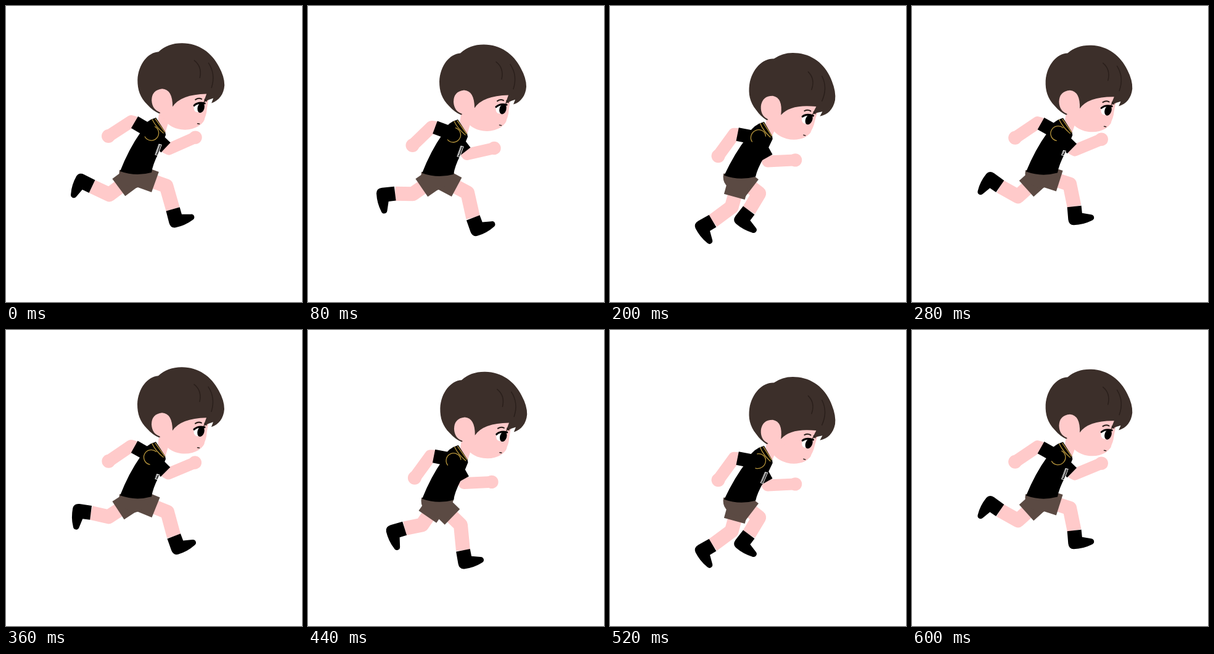
Recreate the animation shown at these times as an HTML page. Size 480 by 480 pixels, loop 0.64 s.

```html
<!DOCTYPE html>
<html lang="en">
<head>
<meta charset="utf-8">
<title>Running boy</title>
<style>
  html, body { margin: 0; width: 100%; height: 100%; overflow: hidden; background: #fff; }
  svg { display: block; width: 100%; height: 100%; }
  .skin { fill: #ffcaca; }
  .limb { fill: none; stroke: #ffcaca; stroke-linejoin: round; }
  .line { fill: none; stroke-linecap: round; }
  .hair { fill: #3c2f2a; }
  .strand { stroke: #2a1f1b; stroke-width: 1.5; }
  .seat { fill: #5b4a43; }
  .shorts { fill: none; stroke: #5b4a43; stroke-width: 35; }
  .gold { stroke: #b8963c; stroke-width: 1.3; }
  .sleeve { fill: none; stroke: #000; stroke-width: 22; }
</style>
</head>
<body>
<svg viewBox="0 0 480 480">
  <defs>
    <path id="foot" d="M-11.5 0H11.5V12L26 16Q30 17 30 21Q30 25 25 26Q12 31 -4 30Q-12 29 -12 20Z"/>
  </defs>
  <path id="backArm" class="limb" stroke-width="20" stroke-linecap="round"/>
  <path id="frontArm" class="limb" stroke-width="19" stroke-linecap="round"/>
  <circle id="backHand" class="skin" r="11"/>
  <circle id="frontHand" class="skin" r="10.7"/>

  <path id="legB" class="limb" stroke-width="23"/>
  <use id="footB" href="#foot"/>
  <path id="legA" class="limb" stroke-width="23"/>
  <use id="footA" href="#foot"/>
  <path id="shortsB" class="shorts"/>
  <path id="shortsA" class="shorts"/>
  <path id="seat" class="seat" d="M184 266Q180 288 208 296Q230 291 237 267Z"/>

  <g id="neck"><path class="skin" d="M249 165L246 188L258 206L264 186Z"/></g>
  <path id="backSleeve" class="sleeve"/>
  <path id="frontSleeve" class="sleeve"/>
  <g id="shirt">
    <path d="M243 181L235 184Q222 191 218 205Q199 232 185 268Q210 277 236 270Q238 257 247 239L259 209L258 204Z"/>
    <path class="line gold" d="M237 184Q243 196 255 206"/>
    <path class="line gold" d="M242 183L257 204"/>
    <path id="ring" class="line gold"/>
    <path id="strip" fill="none" stroke="#fff"/>
  </g>

  <g id="head">
    <path class="skin" d="M255 136H332Q326 158 325 172Q324 177 322 182Q322 187 313 194Q300 202 284 200Q263 197 254 180Z"/>
    <path class="hair" d="M247 74Q262 60 285 60C312 60 333 75 345 98Q354 114 354 128C353 143 345 153 333 157L336 149Q328 151 320 156L325 142Q283 143 270 163L262 170L248 174Q238 170 229 160C217 148 213 136 213 120C214 94 230 75 247 74Z"/>
    <path class="skin" d="M270 163Q270 135 253 134Q236 136 236 153Q237 168 249 172L262 188L280 168Z"/>
    <path class="line strand" d="M305 88Q318 98 314 116M328 92Q340 110 333 132"/>
    <ellipse cx="310" cy="165" rx="5.5" ry="7" fill="#fff"/>
    <ellipse cx="316" cy="164.500" rx="5.5" ry="8.5" transform="rotate(16 316 164.500)"/>
    <path class="line" stroke="#000" stroke-width="3" d="M305 161Q311 155 322 157.500"/>
    <path class="line" stroke="#2a1f1b" stroke-width="2" d="M307 151.500Q312 148 317 150.500"/>
    <path class="line" stroke="#2a1f1b" stroke-width="1.5" d="M322 151L325 154M310.500 190.500L313.500 191"/>
  </g>
</svg>
<script>
const LOOP = 640, STEP = 40, DEG = Math.PI / 180;
const { sin, cos, PI } = Math;

// Arm joints with the limbs spread and with the body crouched.
const arms = {
  back: {
    spread: { shoulder: [228, 200], cuff: [208.5, 188.5], elbow: [203, 187], hand: [166, 211] },
    crouched: { shoulder: [226, 209], cuff: [203.5, 205], elbow: [198, 205], hand: [173, 241] }
  },
  front: {
    spread: { shoulder: [249, 220], cuff: [259, 229.5], elbow: [264, 232], hand: [307, 213] },
    crouched: { shoulder: [244, 231], cuff: [250.5, 243], elbow: [252, 249], hand: [297, 248] }
  }
};

const el = id => document.getElementById(id);
const setPath = (id, d) => el(id).setAttribute("d", d);
const move = (id, transform) => el(id).setAttribute("transform", transform);
const line = (...points) => "M" + points.map(p => p.join(" ")).join("L");
const smooth = u => u * u * (3 - 2 * u);
const clamp = u => Math.min(1, Math.max(0, u));

// A point at a distance; the angle is measured from straight down, forwards positive.
const polar = ([x, y], angle, length) => [x + length * sin(angle * DEG), y + length * cos(angle * DEG)];

// Rises from 0 to 1 and back once per step, highest at the given time.
const pulse = (t, peak, sharpness = 1) =>
  ((1 + cos(4 * PI * (t - peak) / LOOP)) / 2) ** sharpness;

// Joint angles swing as a cosine whose phase runs ahead or lags, in degrees.
const thighAngle = x =>
  7.5 + 65 * cos(x + DEG * (18 * cos(x) - 5 * sin(x) - 18 * sin(2 * x) - 3));
const shinAngle = x =>
  -52 + 68 * cos(x + DEG * (14.5 * cos(2 * x) - 3.5 * sin(2 * x) - 14 * sin(x) - 12 * cos(x) - 5));

function drawLeg(name, x, hip) {
  const thigh = thighAngle(x), shin = shinAngle(x);
  const thighLength = 49 + 4 * cos(2 * x) + 4.5 * sin(x) + 3 * sin(2 * x);
  const knee = polar(hip, thigh, thighLength);
  const ankle = polar(knee, shin, 35 + 4 * cos(x) + 5 * sin(x));
  const tilt = -8 * sin(2 * x);
  setPath("leg" + name, line(hip, knee, ankle));
  setPath("shorts" + name, line(hip, polar(hip, thigh, thighLength * 0.64)));
  move("foot" + name, `translate(${ankle}) rotate(${tilt - shin})`);
}

function drawArm(name, crouch, lean) {
  const { spread, crouched } = arms[name];
  const joint = part => spread[part].map((a, i) => a + (crouched[part][i] - a) * crouch + (3 + i) * lean);
  const cuff = joint("cuff"), hand = joint("hand");
  setPath(name + "Arm", line(cuff, joint("elbow"), hand));
  setPath(name + "Sleeve", line(joint("shoulder"), cuff));
  move(name + "Hand", `translate(${hand})`);
}

function drawTrim(x) {
  const turn = cos(x - 18 * DEG * sin(2 * x));
  const onRing = deg => [235.5 + 12 * cos(deg * DEG), 206 + 12 * sin(deg * DEG)];
  const middle = -55 + 100 * turn;
  setPath("ring", `M${onRing(middle - 105)}A12 12 0 1 1 ${onRing(middle + 105)}`);

  const length = clamp(Math.max(2 * turn, -turn - 0.55));
  const dx = 6 * length, dy = -17 * length;
  setPath("strip", length < 0.1 ? "" : `M242 241l${dx} ${dy}l4 1l${-dx} ${-dy}zM244 240l${dx * 0.9} ${dy * 0.9}`);
}

function draw(t) {
  const x = 2 * PI * t / LOOP;
  const crouch = smooth(pulse(t, 160));
  const lean = pulse(t, 210, 2.5);
  const drop = 6 * crouch;

  const hip = [210, 274 + drop];
  drawLeg("A", x, hip);
  drawLeg("B", x + PI, hip);
  move("seat", `translate(0 ${drop})`);

  drawArm("back", crouch, lean);
  drawArm("front", crouch, lean);
  move("shirt", `translate(0 ${drop + lean}) translate(0 270) skewX(${-4.5 * lean}) translate(0 -270)`);
  drawTrim(x);

  const nod = `translate(${4 * lean} ${12 * pulse(t, 180, 1.3)}) rotate(${7.5 * lean} 253 190)`;
  move("neck", nod);
  move("head", nod);
}

let start;
function tick(now) {
  start ??= now;
  draw(Math.floor(((now - start) % LOOP) / STEP) * STEP);
  requestAnimationFrame(tick);
}
draw(0);
requestAnimationFrame(tick);
</script>
</body>
</html>
```
